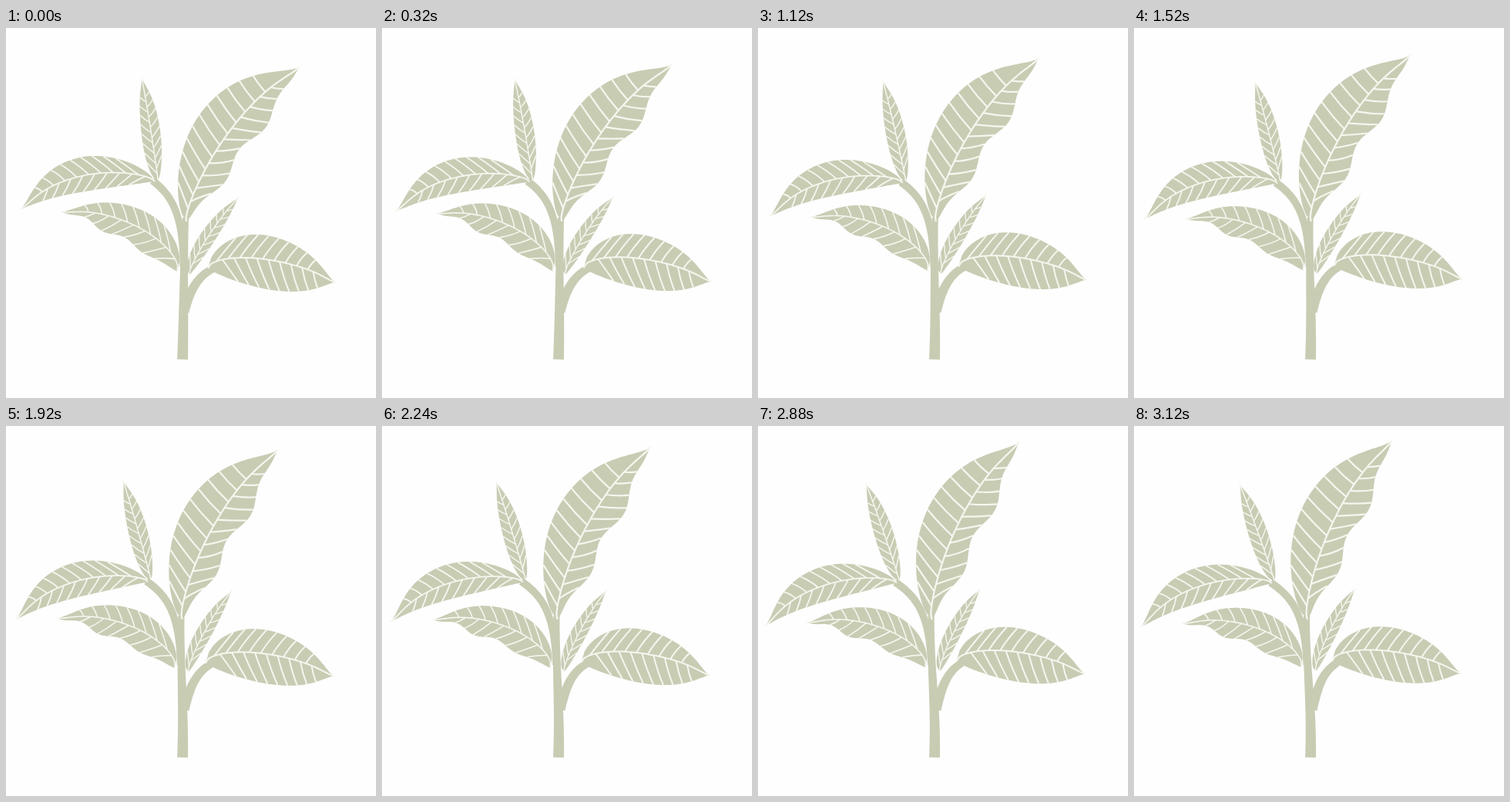
These frames come from a looping animation (480x480 px, 3200 ms). An HTML page with a canvas:

```html
<!DOCTYPE html>
<html lang="en">
<head>
<meta charset="utf-8">
<title>Swaying plant</title>
<style>
html, body { margin: 0; width: 100%; height: 100%; overflow: hidden; background: #fefefe; }
canvas { display: block; width: 480px; height: 480px; }
</style>
</head>
<body>
<canvas id="stage" width="480" height="480"></canvas>
<script>
const ctx = document.getElementById('stage').getContext('2d');
const LEAF = '#c8ccb3', VEIN = '#f6f6ef', PAPER = '#fefefe';
const LOOP = 3200, STEP = 80, LAST = LOOP / STEP - 1;
const SAMPLES = 60;

const mix = (a, b, t) => a + (b - a) * t;
const mixPoint = (p, q, t) => [mix(p[0], q[0], t), mix(p[1], q[1], t)];
const range = n => Array.from({ length: n + 1 }, (_, i) => i / n);

// from / to: base and tip at both ends of the sway.
// left, rib, right: [offset from the base-tip line, skew, ripple].
// veins: [count, left reach, right reach] as shares of the length.
const leaves = [
  { // tall
    from: [[234, 251], [381, 50]], to: [[225, 251], [335, 18]],
    left: [68, 1, 0], rib: [24, 1, 0], right: [-6, 1, 6], veins: [11, .08, .1], width: 2.2
  },
  { // slim upper left
    from: [[197, 197], [176, 64]], to: [[182, 200], [137, 75]],
    left: [12, .7, 0], rib: [-1, 1, 0], right: [-13, 1, 0], veins: [8, .12, .12], width: 1.5
  },
  { // broad left
    from: [[193, 199], [18, 235]], to: [[179, 204], [8, 261]],
    left: [-6, 1.6, 0], rib: [-26, 1, 0], right: [-50, 1, 0], veins: [9, .13, .14], width: 1.8
  },
  { // lower left
    from: [[222, 316], [71, 238]], to: [[217, 313], [62, 256]],
    left: [-6, 1.8, -4], rib: [-28, .8, 0], right: [-50, .8, 0], veins: [8, .14, .14], width: 1.6
  },
  { // slim right
    from: [[238, 320], [302, 219]], to: [[236, 318], [287, 210]],
    left: [16, .75, 0], rib: [6, .8, 0], right: [-4, 1, 0], veins: [7, .13, .13], width: 1.4
  },
  { // broad right
    from: [[262, 312], [428, 330]], to: [[257, 305], [425, 321]],
    left: [51, .75, 0], rib: [20, .75, 0], right: [-19, 1.2, 0], veins: [9, .13, .14], width: 2
  }
];

// Cubic control points at both ends of the sway, and the width at root and end.
const limbs = [
  { from: [[229, 430], [231, 360], [230, 320], [233, 246]],
    to: [[229, 430], [231, 360], [223, 320], [224, 246]], width: [14, 8] },
  { from: [[230, 310], [230, 240], [214, 216], [190, 198]],
    to: [[224, 310], [222, 246], [206, 222], [177, 203]], width: [9, 10] },
  { from: [[231, 368], [238, 342], [248, 322], [269, 312]],
    to: [[231, 368], [238, 340], [244, 319], [264, 307]], width: [13, 10] }
];

// Rises from the base, falls to the tip and narrows into a fine point.
function profile(t, skew) {
  return Math.sin(Math.PI * t ** skew) ** 0.65 * (1 - t ** 12);
}

function trace(points) {
  ctx.beginPath();
  points.forEach(([x, y]) => ctx.lineTo(x, y));
}

function drawLeaf(leaf, p) {
  const [base, tip] = leaf.from.map((q, i) => mixPoint(q, leaf.to[i], p));
  const dx = tip[0] - base[0], dy = tip[1] - base[1], len = Math.hypot(dx, dy);

  function at([offset, skew, ripple], t) {
    if (t <= 0) return base;
    if (t >= 1) return tip;
    const d = profile(t, skew) * (offset + ripple * Math.sin(5.4 * Math.PI * t)) / len;
    return [base[0] + dx * t + dy * d, base[1] + dy * t - dx * d];
  }
  const line = edge => range(SAMPLES).map(t => at(edge, t));

  trace([...line(leaf.left), ...line(leaf.right).reverse()]);
  ctx.fill();

  ctx.lineWidth = leaf.width;
  trace(line(leaf.rib));
  ctx.stroke();

  const [count, ...reach] = leaf.veins;
  [leaf.left, leaf.right].forEach((edge, side) => {
    for (let i = 0; i < count; i++) {
      const t = mix(.06, .86, (i + side / 2) / count);
      const grow = reach[side] * (1 - t * t);
      const bend = mixPoint(at(leaf.rib, t + grow * .4), at(edge, t + grow * .4), .5);
      ctx.beginPath();
      ctx.moveTo(...at(leaf.rib, t));
      ctx.quadraticCurveTo(...bend, ...at(edge, t + grow));
      ctx.stroke();
    }
  });
}

function drawLimb(limb, p) {
  const keys = limb.from.map((q, i) => mixPoint(q, limb.to[i], p));
  function along(points, t) {
    while (points.length > 1) {
      points = points.slice(1).map((q, i) => mixPoint(points[i], q, t));
    }
    return points[0];
  }
  const steps = keys.slice(1).map((q, i) => [q[0] - keys[i][0], q[1] - keys[i][1]]);
  const side = sign => range(SAMPLES).map(t => {
    const [x, y] = along(keys, t), [vx, vy] = along(steps, t);
    const half = sign * mix(...limb.width, t) / 2 / Math.hypot(vx, vy);
    return [x + vy * half, y - vx * half];
  });
  trace([...side(1), ...side(-1).reverse()]);
  ctx.fill();
}

function draw(p) {
  ctx.fillStyle = PAPER;
  ctx.fillRect(0, 0, 480, 480);
  ctx.fillStyle = LEAF;
  ctx.strokeStyle = VEIN;
  limbs.forEach(limb => drawLimb(limb, p));
  leaves.forEach(leaf => drawLeaf(leaf, p));
}

let start;
function tick(now) {
  if (start === undefined) start = now;
  draw(Math.floor((now - start) % LOOP / STEP) / LAST);
  requestAnimationFrame(tick);
}
draw(0);
requestAnimationFrame(tick);
</script>
</body>
</html>
```
